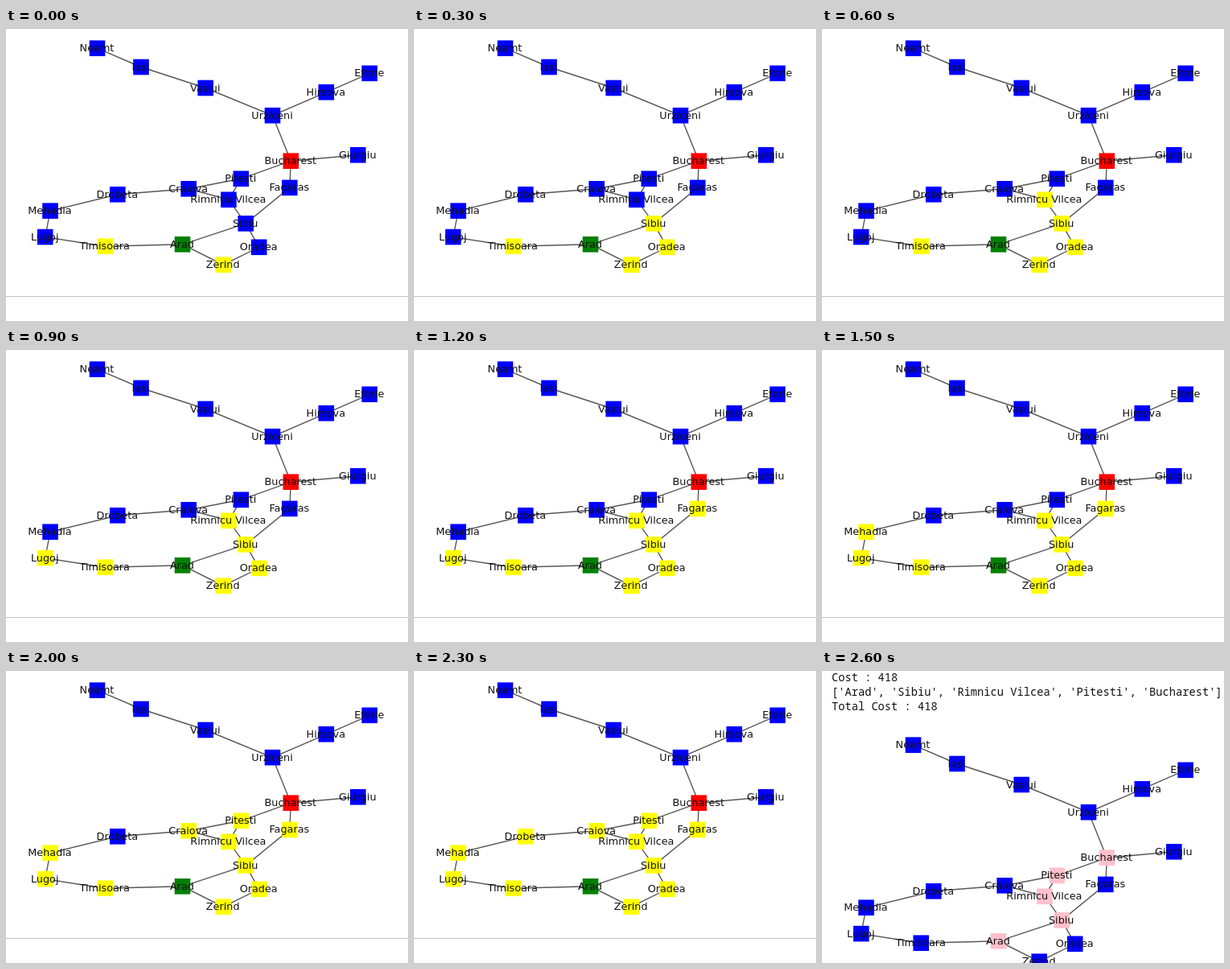
Write an HTML page with a canvas that moves like this. It is 500 px wide and 364 px high and loops after 3400 ms.

```html
<!DOCTYPE html>
<html lang="en">
<head>
<meta charset="utf-8">
<title>Uniform-cost search on a road map</title>
<style>
html, body { margin: 0; width: 100%; height: 100%; overflow: hidden; background: #fff; }
canvas { display: block; }
</style>
</head>
<body>
<canvas id="stage" width="500" height="364"></canvas>
<script>
const ctx = document.getElementById('stage').getContext('2d');
const LOOP = 3400, DONE = 2600, SHIFT = 68, SIZE = 19.6;

const cities = {
  'Neamt': [113.5, 25.2], 'Iasi': [168, 48.5], 'Vaslui': [248.2, 74.5], 'Urziceni': [331.5, 108.7],
  'Hirsova': [398.3, 79.8], 'Eforie': [452.2, 56.3], 'Bucharest': [354.3, 165.2], 'Giurgiu': [437.8, 157.8],
  'Pitesti': [292.3, 187.3], 'Craiova': [227.2, 199.8], 'Drobeta': [138.8, 206.8], 'Mehadia': [55, 227.2],
  'Lugoj': [48.7, 259.6], 'Timisoara': [123.2, 271.2], 'Arad': [219.5, 268.8], 'Zerind': [270.2, 294.2],
  'Oradea': [314.7, 272.3], 'Sibiu': [298.2, 242.9], 'Rimnicu Vilcea': [276.9, 213.3], 'Fagaras': [352.8, 198.4]
};

// Each road is a chain of neighbouring cities
const roads = [
  'Neamt,Iasi,Vaslui,Urziceni,Hirsova,Eforie',
  'Urziceni,Bucharest,Giurgiu',
  'Bucharest,Pitesti,Craiova,Drobeta,Mehadia,Lugoj,Timisoara,Arad,Zerind,Oradea,Sibiu,Fagaras,Bucharest',
  'Arad,Sibiu,Rimnicu Vilcea,Pitesti',
  'Rimnicu Vilcea,Craiova'
].map(road => road.split(','));

// Time in ms at which the search visits each city
const visits = {
  'Zerind': 0, 'Timisoara': 0, 'Sibiu': 100, 'Oradea': 300, 'Rimnicu Vilcea': 600, 'Lugoj': 900,
  'Fagaras': 1200, 'Mehadia': 1500, 'Pitesti': 1800, 'Craiova': 2000, 'Drobeta': 2300
};

const path = ['Arad', 'Sibiu', 'Rimnicu Vilcea', 'Pitesti', 'Bucharest'];
const report = [
  'Cost : 418',
  '[' + path.map(name => `'${name}'`).join(', ') + ']',
  'Total Cost : 418'
];

function color(name, t) {
  if (t >= DONE) return path.includes(name) ? '#ffc0cb' : '#00f';
  if (name === 'Arad') return '#008000';
  if (name === 'Bucharest') return '#f00';
  return t >= visits[name] ? '#ff0' : '#00f';
}

function drawMap(t) {
  ctx.strokeStyle = '#585858';
  ctx.lineWidth = 1.4;
  for (const road of roads) {
    ctx.beginPath();
    for (const name of road) ctx.lineTo(...cities[name]);
    ctx.stroke();
  }
  for (const [name, [x, y]] of Object.entries(cities)) {
    ctx.fillStyle = color(name, t);
    ctx.fillRect(x - SIZE / 2, y - SIZE / 2, SIZE, SIZE);
  }
  ctx.font = '12.8px "DejaVu Sans", sans-serif';
  ctx.textAlign = 'center';
  ctx.fillStyle = '#111';
  for (const [name, [x, y]] of Object.entries(cities)) ctx.fillText(name, x - 0.5, y + 4);
}

function drawReport() {
  ctx.font = '13.72px "Noto Sans Mono", monospace';
  ctx.textAlign = 'left';
  ctx.fillStyle = '#111';
  report.forEach((line, i) => ctx.fillText(line, 12, 14 + 18 * i));
}

function rule(y) {
  ctx.fillStyle = '#c4c4c4';
  ctx.fillRect(0, y, 500, 1);
}

function frame() {
  const t = performance.now() % LOOP, done = t >= DONE;
  ctx.fillStyle = '#fff';
  ctx.fillRect(0, 0, 500, 364);
  rule(0);
  if (done) drawReport();
  else rule(333);
  ctx.save();
  if (done) ctx.translate(0, SHIFT);
  drawMap(t);
  ctx.restore();
  requestAnimationFrame(frame);
}
frame();
</script>
</body>
</html>
```
